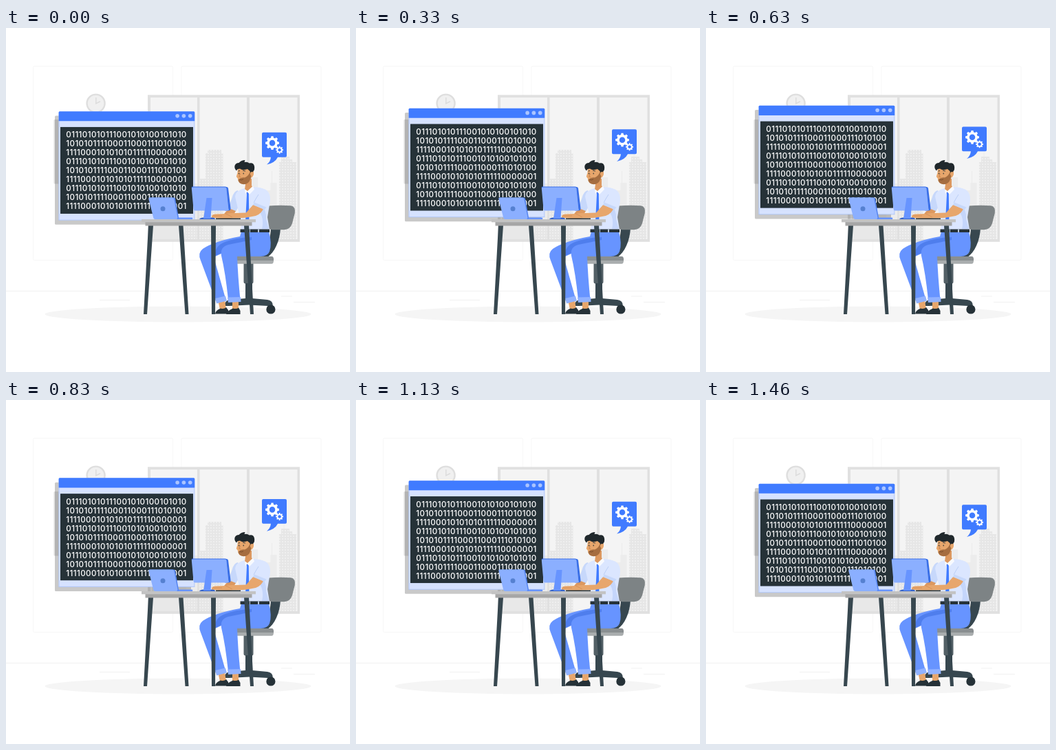
These frames come from a looping animation (500x500 px, 1500 ms). An HTML page:

```html
<!DOCTYPE html>
<html lang="en">
<head>
<meta charset="utf-8">
<title>Developer at work</title>
<style>
html, body { margin: 0; width: 100%; height: 100%; overflow: hidden; background: #fff; }
svg { display: block; width: 100vw; height: 100vh; }
.digits { font: 500 11.6px Inter, "Open Sans", sans-serif; letter-spacing: .4px; fill: #fff; }
</style>
</head>
<body>
<svg viewBox="0 0 500 500">
  <defs>
    <pattern id="panes" width="4" height="4" patternUnits="userSpaceOnUse">
      <rect width="4" height="4" fill="#e6e6e6"/>
      <rect x="1" y="1" width="2" height="2" fill="#efefef"/>
    </pattern>
  </defs>

  <!-- room -->
  <g fill="none" stroke="#f7f7f7">
    <rect x="39.500" y="55.500" width="203" height="282" rx="2"/>
    <rect x="255" y="55.500" width="203" height="282" rx="2"/>
    <path d="M0 382.300H500M400 390H416M136 395.500H180M418 398.500H449" stroke="#f1f1f1"/>
  </g>
  <ellipse cx="250" cy="416" rx="193.500" ry="11.400" fill="#f5f5f5"/>

  <!-- window -->
  <rect x="206" y="97.300" width="221" height="213.500" fill="#e0e0e0"/>
  <g fill="#f4f4f4">
    <rect x="210" y="101" width="68" height="206"/>
    <rect x="281.500" y="101" width="68.500" height="206"/>
    <rect x="354" y="101" width="69.500" height="206"/>
  </g>
  <path d="M212 307V260H262V307Z" fill="#e8e8e8"/>
  <g fill="#ececec">
    <path d="M354 307V217H366V307ZM366 307V236H385V307ZM262 307V226H278V307ZM384.500 307V225H393.500V307Z"/>
    <path d="M358 217H363V222H358ZM386 208H387V225H386Z"/>
  </g>
  <g fill="url(#panes)">
    <path d="M290 307V182H293V177H313V182H315.500V307Z"/>
    <path d="M397 307V195H400V187H412V191H416V195H422V307Z"/>
    <path d="M281.500 307V219H290V307ZM262 307V288H278V307Z"/>
  </g>
  <path d="M404 181V187" stroke="#ececec"/>

  <!-- clock -->
  <circle cx="130.600" cy="109.600" r="13" fill="#f0f0f0" stroke="#dedede" stroke-width="2.400"/>
  <path d="M130.800 101V109.700L137 106.800" fill="none" stroke="#dcdcdc" stroke-width="1.500"/>

  <rect x="69.300" y="133" width="9" height="93.500" rx="1.500" fill="#e3e3e3"/>

  <!-- code panel -->
  <g class="float">
    <rect x="71" y="128" width="198" height="158.300" rx="1.500" fill="#000" fill-opacity=".21"/>
    <rect x="76.600" y="121.700" width="197.700" height="158.300" rx="1.500" fill="#d6e2ff"/>
    <path d="M76.600 279.700H274.300M77 136V280M273.800 136V280" stroke="#a9c2f8" stroke-width=".8"/>
    <path d="M76.600 135.800V123.200Q76.600 121.700 78 121.700H272.800Q274.300 121.700 274.300 123.200V135.800Z" fill="#407bff"/>
    <g fill="#abc5ff">
      <circle cx="249.100" cy="128.400" r="2.800"/>
      <circle cx="258.400" cy="128.400" r="2.800"/>
      <circle cx="267.700" cy="128.400" r="2.800"/>
    </g>
    <rect x="79" y="144.500" width="193" height="126" fill="#263238"/>
    <g id="rows" class="digits"></g>
  </g>

  <!-- speech bubble -->
  <g class="float">
    <path d="M374 152.300H406Q408 152.300 408 154.300V186.200Q408 188.200 406 188.200H395Q391 196.500 379 199Q384.500 194.500 385 188.200H374Q372 188.200 372 186.200V154.300Q372 152.300 374 152.300Z" fill="#407bff"/>
    <path id="bigGear" fill="#fff" fill-rule="evenodd"/>
    <path id="smallGear" fill="#fff" fill-rule="evenodd"/>
  </g>

  <!-- chair -->
  <path d="M385 291H399C398 309 391 326 379 334H366C379 324 384 311 385 291Z" fill="#37474f"/>
  <path d="M382 258.500Q398 257 414 258.300Q421 259.500 419.800 269L416 284Q413 293 404 293.300H387Q381 293 380.300 287L377.700 263Q377.500 259 382 258.500Z" fill="#7d8385"/>
  <path d="M345.500 342H359.500V369Q359.500 371.500 357 371.500H348Q345.500 371.500 345.500 369Z" fill="#536066"/>
  <path d="M348 371H358V393L380 395Q388 396 388 404H381L353 402.500L324 404H317Q318 396 325 395L348 393Z" fill="#37474f"/>
  <circle cx="384.900" cy="409" r="6.600" fill="#263238"/>
  <path d="M336 332H387Q389.500 333 389 338H336Z" fill="#8a8f91"/>
  <path d="M336 338H389Q389 342.700 386 342.700H336Z" fill="#a9adae"/>

  <!-- legs -->
  <path d="M308 396H318L320 409H311ZM329 396H338V409H329Z" fill="#e7a66c"/>
  <g fill="#263238">
    <path d="M304 415.500Q304 411 312 407.500Q317 409 320 406L323 410V415.500Z"/>
    <path d="M320 416Q320 412 330 407.500Q335 409 338 406.500L340.500 411V416Z"/>
  </g>
  <path d="M342 296H370L366 313Q330 319 302 333L319 393L305 397L283 338Q278 327 286 321Q302 310 340 303Z" fill="#6794ff"/>
  <path d="M357 304Q332 305 318 311Q303 317 304 331L316 326L357 314Z" fill="#4f7eed"/>
  <path d="M357 296H382Q387 314 383 325Q380 332 370 332H336Q337 360 340.500 395H323Q319 356 313 331Q311 318 323 315Q343 311 357 308Z" fill="#6794ff"/>
  <path d="M304 393L319 389.500L321 396.500L306 400.500ZM322 391.500L341 391L341.500 398L323 399Z" fill="#91b2ff"/>

  <!-- body -->
  <path d="M337 236Q331 237 328.500 247L323 263L334 267L342 252Z" fill="#c7d8fb"/>
  <path d="M324 262L334 266L331 271L319 274L317 270Z" fill="#dc985f"/>
  <path d="M346 233L358 231Q370 231 377 235Q384 240 384 251L380 275L383 293H341Q344 281 338 267L333 245Q333 237 346 233Z" fill="#dbe6ff"/>
  <path d="M371 259Q379 264 378 278L382 292H372Q376 275 366 264Z" fill="#c5d6fb"/>
  <path d="M340.500 292.500H383V297H340.500Z" fill="#263238"/>
  <path d="M354 292.500H355V297H354ZM366 292.500H368V297H366Z" fill="#b9c5d8"/>
  <path d="M349 236L353.500 237L352.800 242L353.500 286L350.500 291L347.800 286L350 242Z" fill="#407bff"/>
  <path d="M375 260Q372 270 363 273Q345 277 330 276.500Q317 278 299 275.500Q298 271 304 270.500L319 270Q326 268.500 333 269L349 268.500L361 255Z" fill="#e7a66c"/>
  <path d="M301 273H314M319 270Q324 272 329 275" fill="none" stroke="#cf8b52" stroke-width=".7"/>
  <path d="M364 239Q372 231 379 236Q385 241 383.500 252Q380 260 376 264L359 257Z" fill="#dbe6ff"/>
  <path d="M359 257L376 264L378.500 260.500L361 253.500Z" fill="#c7d8fb"/>
  <path d="M367 242Q363 248 360 254" fill="none" stroke="#b3c8f3" stroke-width=".8"/>

  <!-- head -->
  <path d="M349 219H357V229L360 234L351 239L347 235Z" fill="#dc985f"/>
  <path d="M347 234L351 237L359 229.500L361 234.500L354 242L350.500 238L348 241.500Z" fill="#f8faff"/>
  <path d="M337 204L354 201Q360 204 360 211Q360 216 356 218Q354 226 345 227Q337 226 337 219L334.800 216L336.500 210Z" fill="#e7a66c"/>
  <path d="M355 208L357 212L355.500 219Q353 227 345.500 227.300Q338 226.500 337.500 220.500Q342 216.500 347 217.500Q353 215 355 208Z" fill="#a56d40"/>
  <path d="M339.500 220.500Q342.500 221.500 345 219.800" fill="none" stroke="#6f4526" stroke-width=".8"/>
  <path d="M337.500 208L340 207.500M344 207L348 208" stroke="#263238" stroke-width=".9"/>
  <ellipse cx="338.600" cy="211.500" rx=".7" ry="1.100" fill="#263238"/>
  <ellipse cx="345.200" cy="211.500" rx=".7" ry="1.100" fill="#263238"/>
  <path d="M340.500 211.500L338.800 216L341.300 216.500" fill="none" stroke="#bf7944" stroke-width=".8"/>
  <path d="M335 207.500Q331.500 204 332.500 200Q334 196 338.500 196Q342 192 347.500 192L346.500 195Q351 194 353.500 196.500Q360 195 361 201Q362 206 358.800 209L356.500 214L354.500 208L351 205Q344 207.500 340 204.500Q336 204.500 335 207.500Z" fill="#20282c"/>
  <ellipse cx="357.300" cy="212" rx="2.300" ry="3" fill="#e7a66c"/>

  <!-- desk -->
  <path d="M207 287H214L205 416H200ZM251 287H257.500L265.500 416H260.500ZM298 287H305L304 416H299ZM346 287H353L360 416H355Z" fill="#37474f"/>
  <rect x="202.500" y="281.500" width="155" height="6" fill="#a6a6a6"/>
  <rect x="197" y="278" width="166" height="4.300" fill="#c3c3c3"/>
  <path d="M305 276.500H341V278H305Z" fill="#263238"/>

  <!-- monitor -->
  <path d="M318 231H320.500Q322.500 231 323 233L326.500 262Q327 265.500 323 265.500H318Z" fill="#3a6fe6"/>
  <path d="M271.500 231H318.500Q320.500 231 321 233L324 263Q324 265.500 322 265.500H275Q272.800 265.500 272.500 263L269.800 233Q269.600 231 271.500 231Z" fill="#8bafff"/>
  <path d="M270 232Q270 231 271.500 231H318.500Q320.500 231 321 233L324 263" fill="none" stroke="#3a6fe6" stroke-width="1.100"/>
  <path d="M281 278Q282 275.500 287 275.500H300Q304 275.500 304 278Z" fill="#3564c9"/>
  <path d="M291.500 247H299.500L297.500 277H287Z" fill="#6794ff"/>

  <!-- laptop -->
  <path d="M217 278V275.500H270.500Q272 276 271 278Z" fill="#6794ff"/>
  <path d="M209 246.500H244Q245.500 246.500 246 248L251 275.500Q251 278 248 278H218Z" fill="#5585f0"/>
  <path d="M208.500 246.500H242Q243.700 246.500 244.200 248L249.500 275.500Q249.500 278 247.500 278H217Q214.800 278 214.300 276L207.400 248.500Q207 246.500 208.500 246.500Z" fill="#8bafff"/>
  <circle cx="228" cy="262.700" r="3.500" fill="#5580d0"/>
</svg>
<script>
const LOOP = 1500, STEPS = 36, LIFT = 10;
const byId = id => document.getElementById(id);

const lines = [
  "011101010111001010100101010",
  "101010111100011000111010100",
  "111100010101010111110000001"
];
for (let i = 0; i < 9; i++) {
  const row = document.createElementNS("http://www.w3.org/2000/svg", "text");
  row.setAttribute("x", 87.3);
  row.setAttribute("y", 160 + i * 13);
  row.textContent = lines[i % 3];
  byId("rows").append(row);
}

// Toothed ring with a round hole
function gear(cx, cy, outer, inner, hole, teeth) {
  const pitch = 2 * Math.PI / teeth, pts = [];
  const add = (r, a) => pts.push((cx + r * Math.cos(a)).toFixed(2) + " " + (cy + r * Math.sin(a)).toFixed(2));
  for (let i = 0; i < teeth; i++) {
    const a = i * pitch;
    add(inner, a - pitch * 0.3);
    add(outer, a - pitch * 0.2);
    add(outer, a + pitch * 0.2);
    add(inner, a + pitch * 0.3);
  }
  return `M${pts.join("L")}ZM${cx - hole} ${cy}a${hole} ${hole} 0 1 0 ${2 * hole} 0a${hole} ${hole} 0 1 0 ${-2 * hole} 0Z`;
}
byId("bigGear").setAttribute("d", gear(387, 167.7, 10, 7.8, 4.3, 8));
byId("smallGear").setAttribute("d", gear(397.6, 177.8, 5.5, 4.2, 2.3, 8));

const floats = document.querySelectorAll(".float");

// Linear rise and fall, held in steps
function draw(time) {
  const step = Math.min(STEPS - 1, Math.floor((time % LOOP + 5) * STEPS / LOOP));
  const phase = (step + 1) % STEPS / STEPS;
  const y = -LIFT * (1 - Math.abs(1 - 2 * phase));
  for (const g of floats) g.setAttribute("transform", `translate(0 ${y.toFixed(3)})`);
}

const start = performance.now();
function tick() {
  draw(performance.now() - start);
  requestAnimationFrame(tick);
}
tick();
</script>
</body>
</html>
```
